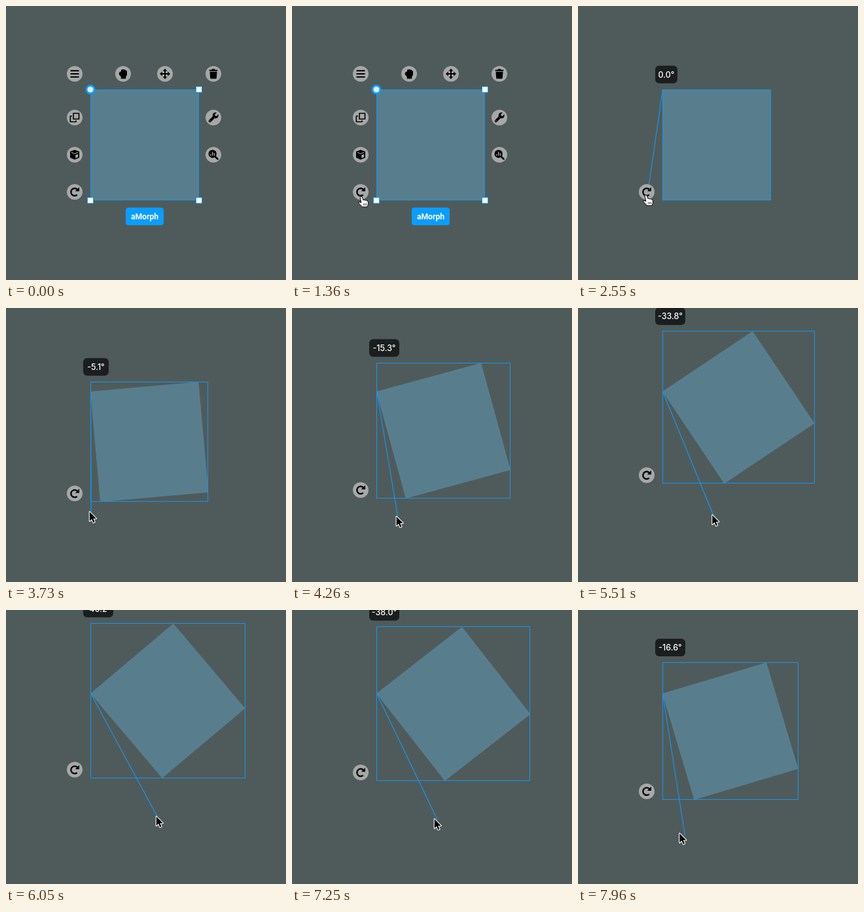
Write an HTML page with a canvas that moves like this. It is 428x420 px and loops after 8 s.

```html
<!DOCTYPE html>
<html lang="en">
<head>
<meta charset="utf-8">
<title>Rotating a morph</title>
<style>
  html, body { margin: 0; width: 100%; height: 100%; overflow: hidden; background: #4f5b5b; }
  canvas { display: block; }
</style>
</head>
<body>
<canvas id="stage" width="428" height="420"></canvas>
<script>
const ctx = document.getElementById('stage').getContext('2d');
const LOOP = 8000;
const BG = '#4f5b5b', MORPH = '#587e8e', BLUE = '#1496f0', BRIGHT = '#0a9dff';
const GREY = '#a6a8a8', DARK = '#1b1e1f';
const ORIGIN = { x: 129, y: 128 }, W = 166, H = 170;
const CURSOR_IN = 540, TIP_FADE = 2020, TIP_SHOWN = 2070, GRAB = 2310;

// time, pointer x, pointer y
const approach = [
  [540, 146, 391], [800, 134, 357], [1100, 113, 306], [1300, 107, 293],
  [1420, 105.5, 291], [1580, 105.5, 291], [1660, 104, 289.5]
];
// time, pointer x, pointer y, guide offset x, guide offset y, degrees
const drag = [
  [2600, 104, 289.5, 2, 1, 0],
  [3090, 110, 302, 2, 1, 0.2],
  [3730, 127, 311, 3, 2, 5.1],
  [3910, 138, 313, 3, 2, 7.1],
  [4670, 180, 322, 2.5, 1, 24.6],
  [4730, 182, 321, 2, 1, 25.1],
  [5510, 204.5, 316, 2, 1, 33.8],
  [5570, 208, 316, 2, 1, 35],
  [6050, 229, 315, 2, 1, 40.2],
  [6770, 229, 315, 2, 1, 40.2],
  [7250, 217, 319, 5, 2, 38],
  [7550, 189, 331, 6, 3, 30.7],
  [7960, 154.5, 341, 9, 5, 16.6]
];

// Monotone cubic interpolation of one column.
function sample(keys, col, t) {
  const last = keys.length - 1;
  if (t <= keys[0][0]) return keys[0][col];
  if (t >= keys[last][0]) return keys[last][col];
  const i = keys.findIndex(k => k[0] > t) - 1;
  const rate = j => (keys[j + 1][col] - keys[j][col]) / (keys[j + 1][0] - keys[j][0]);
  const slope = j => {
    if (j === 0 || j === last) return rate(Math.min(j, last - 1));
    const a = rate(j - 1), b = rate(j);
    return a * b <= 0 ? 0 : 2 * a * b / (a + b);
  };
  const span = keys[i + 1][0] - keys[i][0];
  const u = (t - keys[i][0]) / span, v = 1 - u;
  return keys[i][col] * (1 + 2 * u) * v * v + keys[i + 1][col] * u * u * (3 - 2 * u)
    + span * (slope(i) * u * v * v - slope(i + 1) * u * u * v);
}

function disc(x, y, r, color) {
  ctx.fillStyle = color;
  ctx.beginPath();
  ctx.arc(x, y, r, 0, Math.PI * 2);
  ctx.fill();
}

function box(x, y, w, h, r, color) {
  ctx.fillStyle = color;
  ctx.beginPath();
  ctx.roundRect(x, y, w, h, r);
  ctx.fill();
}

function text(str, x, y, font, align = 'left') {
  ctx.font = font;
  ctx.textAlign = align;
  ctx.textBaseline = 'alphabetic';
  ctx.fillStyle = '#fff';
  ctx.fillText(str, x, y);
}

function fill(d, color = '#000') {
  ctx.fillStyle = color;
  ctx.fill(new Path2D(d));
}

function stroke(d, width, color = '#000') {
  ctx.strokeStyle = color;
  ctx.lineWidth = width;
  ctx.stroke(new Path2D(d));
}

const icons = {
  menu() { stroke('M-6.5 -4.7H6.5M-6.5 0H6.5M-6.5 4.7H6.5', 2); },
  fist() {
    fill('M-3 -5.5Q-2 -7.2 -.5 -6.4Q.8 -7.8 2.2 -6.2Q3.8 -6.8 4.3 -5Q6 -5 6 -3V.5Q6 2.6 4.2 4.2V7.5H-3.2V4.5L-5.8 1.5Q-6.6 .3 -6.2 -1L-5.5 -2.6Q-4.8 -3.6 -3 -3.4Z');
  },
  move() {
    stroke('M-5.5 0H5.5M0 -5.5V5.5', 2);
    for (let i = 0; i < 4; i++) {
      fill('M0 -8L3.4 -4.2H-3.4Z');
      ctx.rotate(Math.PI / 2);
    }
  },
  trash() {
    fill('M-6.3 -6.2H-2.6L-2 -7.4H2L2.6 -6.2H6.3V-4.2H-6.3ZM-5.5 -3.3H5.5L4.9 6Q4.8 7.5 3.4 7.5H-3.4Q-4.8 7.5 -4.9 6Z');
  },
  copy() {
    ctx.lineJoin = 'round';
    stroke('M-2 -6.5H6.5V2.2H-2Z', 1.6);
    stroke('M-4 -2.2H-6.7V6.5H2V4.2', 1.6);
  },
  wrench() {
    ctx.lineCap = 'round';
    stroke('M-5.3 5.3L2 -2', 4);
    disc(3.2, -3.2, 4.5, '#000');
    ctx.lineCap = 'butt';
    stroke('M3 -3L8.2 -8.2', 3.4, GREY);
    disc(-5.2, 5.2, .8, GREY);
  },
  cube() {
    fill('M0 -7.6L7 -5V4.4L0 7.6L-7 4.4V-5Z');
    stroke('M-5.3 -3.7L0 -1.6L5.3 -3.7', 1.1, GREY);
    fill('M1.2 .6L5.2 -1.1V3.4L1.2 5.3Z', GREY);
  },
  chart() {
    disc(-1.3, -1.3, 6.2, '#000');
    ctx.lineCap = 'round';
    stroke('M3 3L6.6 6.6', 2.6);
    ctx.lineCap = 'butt';
    stroke('M-4.2 -.8V1.6M-1.4 -4.6V1.6M1.4 -2.6V1.6', 1.4, GREY);
  },
  rotate() {
    ctx.strokeStyle = '#000';
    ctx.lineWidth = 2.3;
    ctx.beginPath();
    ctx.arc(0, .2, 5.7, Math.PI * .27, Math.PI * 1.8);
    ctx.stroke();
    fill('M7 -7.2V-.9H.8Z');
  }
};

function button(name, x, y) {
  disc(x, y, 12, GREY);
  ctx.save();
  ctx.translate(x, y);
  icons[name]();
  ctx.restore();
}

function knob(x, y) {
  box(x - 5, y - 5, 10, 10, 1, BRIGHT);
  box(x - 4, y - 4, 8, 8, 0, '#fff');
}

function drawHalo() {
  [['menu', 105, 104], ['fist', 179, 104], ['move', 243, 104], ['trash', 317, 104],
   ['copy', 105, 171], ['wrench', 317, 171], ['cube', 105, 228], ['chart', 317, 228],
   ['rotate', 105, 285]].forEach(b => button(...b));
  disc(129, 128, 7.5, BRIGHT);
  disc(129, 128, 4.6, '#d9edfa');
  knob(295, 128);
  knob(129, 298);
  knob(295, 298);
  box(183, 309, 58, 27, 4, BRIGHT);
  text('aMorph', 212, 327, 'bold 12.2px Roboto, sans-serif', 'center');
}

function drawTooltip(t) {
  if (t < TIP_FADE || t >= GRAB) return;
  ctx.globalAlpha = t < TIP_SHOWN ? 0.5 : 1;
  box(105, 303, 85, 28, 6, DARK);
  text('Rotate morph', 147.5, 321, '500 11.5px Inter, sans-serif', 'center');
  ctx.globalAlpha = 1;
}

function drawCursor(x, y) {
  ctx.save();
  ctx.translate(x, y);
  ctx.lineJoin = 'round';
  if (Math.hypot(x - 105, y - 285) < 12) {
    const hand = 'M-1.8 1.6Q-.6 -.6 1.2 1L3 6Q4.8 4.9 6 6.4Q7.6 5.7 8.7 7.2Q10.2 7 10.4 9V12Q10 14 9 16.4H1.6L-4 10.6Q-4.8 8.7 -3 8.7L-.2 10Z';
    fill(hand, '#fff');
    stroke(hand, 1);
    stroke('M3.4 11V14M5.5 11V14M7.6 11V14', .8);
  } else {
    const arrow = 'M.8 1.5V15.6L4.1 12.5L6.4 17.9L8.6 17L6.3 11.7H10.8Z';
    stroke(arrow, 2.2, '#fff');
    fill(arrow);
  }
  ctx.restore();
}

function drawMorph(deg) {
  const a = -deg * Math.PI / 180;
  ctx.save();
  ctx.translate(ORIGIN.x, ORIGIN.y);
  ctx.rotate(a);
  ctx.fillStyle = MORPH;
  ctx.fillRect(0, 0, W, H);
  ctx.restore();

  const sin = Math.sin(-a), cos = Math.cos(a);
  const left = ORIGIN.x, top = ORIGIN.y - W * sin;
  const right = left + W * cos + H * sin, bottom = ORIGIN.y + H * cos;
  const x = left + .5, y = Math.floor(top) + .5;
  ctx.strokeStyle = BLUE;
  ctx.lineWidth = 1;
  ctx.strokeRect(x, y, Math.round(right) - .5 - x, Math.round(bottom) - .5 - y);
  return { top, bottom };
}

function drawAngle(deg, top) {
  const value = deg.toFixed(1);
  const shown = value === '0.0' ? value : '-' + value;
  const width = 34 + (shown[0] === '-' ? 5 : 0) + (value.length > 3 ? 7 : 0);
  box(118, top - 36.5, width, 27, 6, DARK);
  text(shown + '°', 118 + width / 2, top - 18.3, '500 12.5px Inter, sans-serif', 'center');
}

function draw(t) {
  ctx.fillStyle = BG;
  ctx.fillRect(0, 0, 428, 420);
  const path = t < GRAB ? approach : drag;
  const x = sample(path, 1, t), y = sample(path, 2, t);

  if (t < GRAB) {
    drawMorph(0);
    drawHalo();
    drawTooltip(t);
  } else {
    const deg = sample(drag, 5, t);
    const { top, bottom } = drawMorph(deg);
    ctx.strokeStyle = BLUE;
    ctx.lineWidth = 1.2;
    ctx.beginPath();
    ctx.moveTo(ORIGIN.x + .5, ORIGIN.y);
    ctx.lineTo(x + sample(drag, 3, t), y + sample(drag, 4, t));
    ctx.stroke();
    button('rotate', 105, bottom - 13);
    drawAngle(deg, top);
  }
  if (t >= CURSOR_IN) drawCursor(x, y);
}

const start = performance.now();
function tick() {
  draw((performance.now() - start) % LOOP);
  requestAnimationFrame(tick);
}
tick();
</script>
</body>
</html>
```
